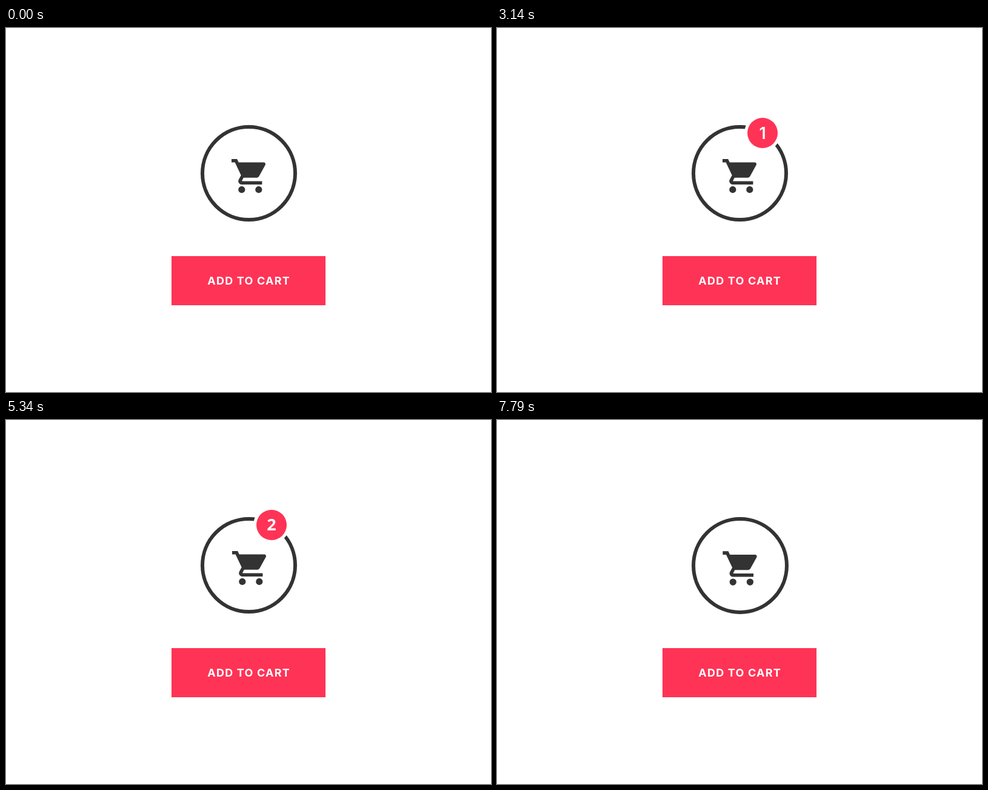
Animation, 800 px wide and 600 px high, one loop 7820 ms. Source, as an HTML page:

```html
<!DOCTYPE html>
<html lang="en">
<head>
<meta charset="utf-8">
<title>Add to cart</title>
<style>
  html, body { margin: 0; width: 100%; height: 100%; overflow: hidden; background: #fff; }
  svg { display: block; width: 800px; height: 600px; }
  text { fill: #fff; text-anchor: middle; font-family: Inter, sans-serif; }
  .label { font-size: 18px; font-weight: 700; letter-spacing: 1.2px; }
  .one { font-size: 26.5px; font-weight: 600; }
  .two { font-size: 27px; font-weight: 700; font-family: "Open Sans", "Noto Sans", sans-serif; }
</style>
</head>
<body>
<svg viewBox="0 0 800 600">
  <defs>
    <clipPath id="inside"><circle cx="400.5" cy="239.5" r="74"/></clipPath>
  </defs>

  <g id="basket">
    <circle cx="400.5" cy="239.5" r="76.5" fill="none" stroke="#333" stroke-width="6"/>
    <g clip-path="url(#inside)">
      <g id="cart">
        <path fill="#333" transform="translate(369.2 210.4) scale(2.8)"
          d="M1 2v2h2l3.6 7.59-1.35 2.45c-.16.28-.25.61-.25.96 0 1.1.9 2 2 2h12v-2H7.42c-.14 0-.25-.11-.25-.25l.03-.12.9-1.63h7.45c.75 0 1.41-.41 1.75-1.03l3.58-6.49c.08-.14.12-.31.12-.48 0-.55-.45-1-1-1H5.21l-.94-2z"/>
        <circle cx="388.8" cy="266.4" r="5.6" fill="#333"/>
        <circle cx="416.8" cy="266.4" r="5.6" fill="#333"/>
      </g>
    </g>
    <g id="badge">
      <circle r="30" fill="#fff"/>
      <circle r="25" fill="#f35"/>
      <text id="count"></text>
    </g>
  </g>

  <rect id="button" x="273" y="376" width="254" height="81" fill="#f35"/>
  <text class="label" x="400.6" y="423.3">ADD TO CART</text>
  <path id="cursor" d="M0 0V24L5.6 18.6L10.8 29L13.8 27.6L9 17H17Z"/>
</svg>

<script>
const LOOP = 7820, STEP = 30;
const APPROACH = [2000, 4140], CLICK = [2480, 4680], LEAVE = 7340, POP = 7640;
const $ = id => document.getElementById(id);
const basket = $("basket"), cart = $("cart"), badge = $("badge"),
      count = $("count"), button = $("button"), cursor = $("cursor");

// Linear interpolation through [time, value] points, held at both ends.
function track(points, t) {
  if (t <= points[0][0]) return points[0][1];
  for (let i = 1; i < points.length; i++) {
    const [t0, a] = points[i - 1], [t1, b] = points[i];
    if (t < t1) return a + (b - a) * (t - t0) / (t1 - t0);
  }
  return points[points.length - 1][1];
}

// Motion advances in whole steps counted from the start of each phase.
function quantise(t) {
  const start = [0, APPROACH[0], CLICK[0], APPROACH[1], CLICK[1], LEAVE].filter(s => s <= t).pop();
  return start + Math.floor((t - start) / STEP) * STEP;
}

function show(el, on) {
  el.style.display = on ? "" : "none";
}

function drawCursor(t) {
  const i = t < CLICK[0] ? 0 : 1;
  const from = [507, 517][i], to = [452, 447][i], travel = [150, 210][i];
  const dt = t - APPROACH[i];
  const visible = dt >= 0 && t < CLICK[i];
  show(cursor, visible);
  cursor.setAttribute("transform", `translate(417 ${track([[0, from], [travel, to]], dt)})`);
  button.setAttribute("fill", visible && dt >= travel + STEP ? "#ff99aa" : "#f35");
}

function drawCart(t) {
  const second = t >= CLICK[1];
  const dt = t - CLICK[second ? 1 : 0];
  const rest = second && t < LEAVE ? 1 : 0;
  const x = dt < 210
    ? track([[0, 0], [210, 110]], dt)
    : track([[210, -110], [420, 8], [480, rest]], dt);
  cart.setAttribute("transform", `translate(${x} 0)`);
}

function drawBadge(t) {
  const second = t >= CLICK[1];
  const dt = t - CLICK[second ? 1 : 0];
  const two = second && dt >= 450;
  const scale = track([[450, second ? 1 : 0], [570, 1.6], [660, 1]], dt);
  show(badge, scale > 0 && t < POP);
  badge.setAttribute("transform", `translate(438 173) scale(${scale})`);
  count.textContent = two ? "2" : "1";
  count.setAttribute("class", two ? "two" : "one");
  count.setAttribute("y", two ? 8.5 : 10);
}

function drawBasket(t) {
  let move = "";
  if (t >= POP) {
    const scale = track([[POP, .4], [POP + 60, 1.19], [POP + 150, 1.006]], t);
    move = `translate(401 240) scale(${scale}) translate(-400.5 -239.5)`;
  } else if (t >= LEAVE) {
    move = `translate(${track([[LEAVE, 30], [LEAVE + 240, -482]], t)} 0)`;
  }
  basket.setAttribute("transform", move);
}

function frame(now) {
  const t = quantise(now % LOOP);
  drawCursor(t);
  drawCart(t);
  drawBadge(t);
  drawBasket(t);
  requestAnimationFrame(frame);
}
frame(0);
</script>
</body>
</html>
```
